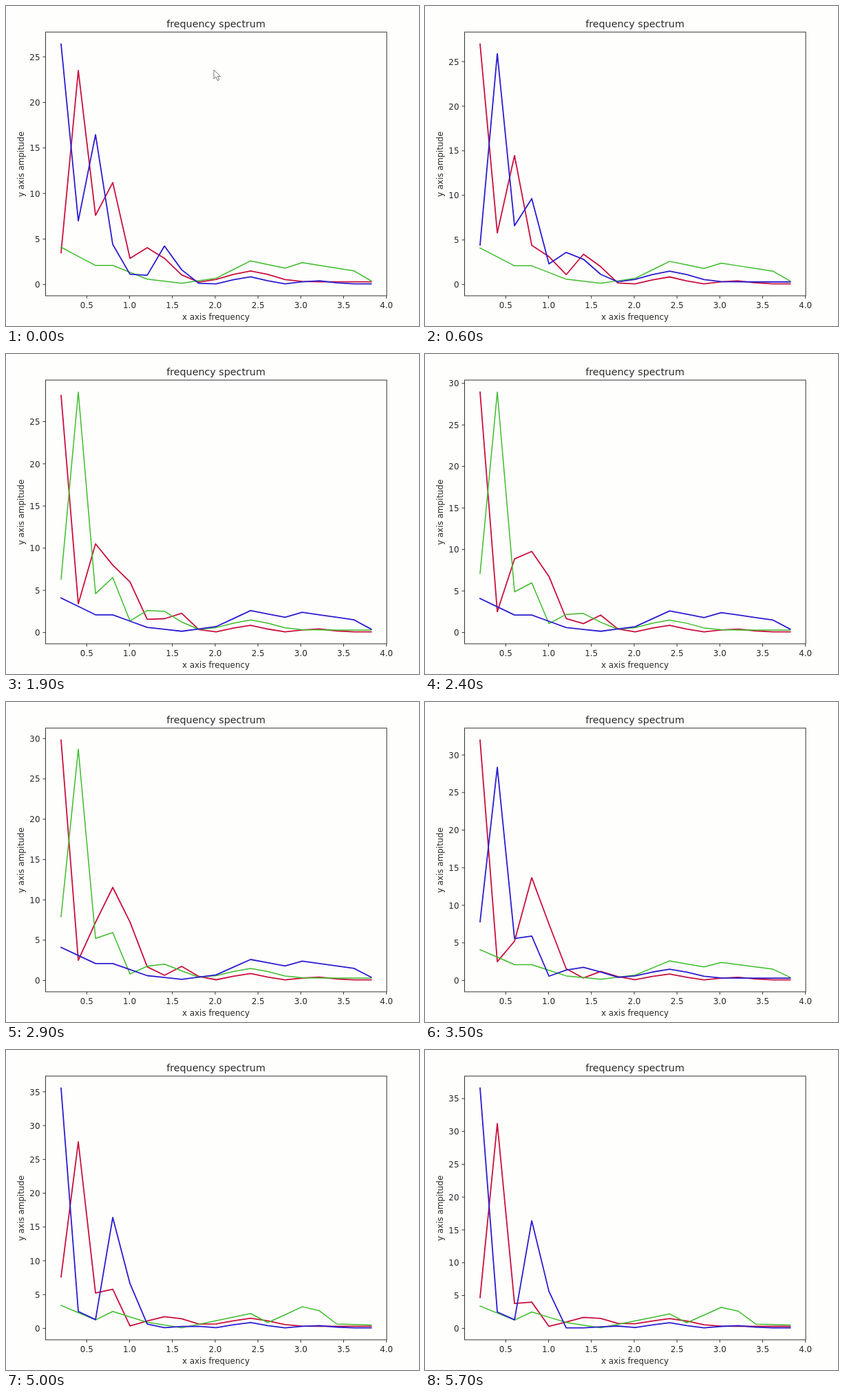
Recreate the animation shown at these times as an HTML page. Size 600 by 466 pixels, loop 5.8 s.

```html
<!DOCTYPE html>
<html lang="en">
<head>
<meta charset="utf-8">
<title>frequency spectrum</title>
<style>
  html, body { margin: 0; width: 100%; height: 100%; overflow: hidden; background: #fefefd; }
  svg { display: block; width: 600px; height: 466px; }
  text { font-family: "DejaVu Sans", Verdana, sans-serif; font-size: 11.9px; fill: #292929; }
  .title { font-size: 14.28px; }
  .axis { fill: none; stroke: #333; stroke-width: 1; }
  .curve { fill: none; stroke-linejoin: round; stroke-linecap: square; }
  .red { stroke: #c90f3c; stroke-width: 1.8; }
  .green { stroke: #3cbc2a; stroke-width: 1.5; }
  .blue { stroke: #2b1cd0; stroke-width: 1.8; }
</style>
</head>
<body>
<svg viewBox="0 0 600 466">
  <g id="curves"></g>
  <rect class="axis" x="57.5" y="38" width="495.6" height="384"/>
  <g id="xTicks"></g>
  <g id="yTicks"></g>
  <text class="title" x="305" y="31" text-anchor="middle">frequency spectrum</text>
  <text x="305" y="456.8" text-anchor="middle">x axis frequency</text>
  <text transform="translate(25.5 230.4) rotate(-90)" text-anchor="middle">y axis ampitude</text>
  <path id="cursor" d="M302 93v13l3-2.8 2.4 5.4 2.3-1-2.3-5.1h4z" fill="#fff" stroke="#777" stroke-width="1"/>
</svg>
<script>
const LOOP = 5800, STEP = 100, BINS = 19;
const BOTTOM = 404.6, SPAN = 349.1, FIRST_X = 80, GAP = 25.03;

const clamp = (v, low, high) => Math.min(high, Math.max(low, v));
const bump = (x, center, width) => Math.exp(-(((x - center) / width) ** 2));
const mix = (a, b, u) => a + (b - a) * u;

// Straight lines through [position, value] points, flat beyond both ends.
function track(at, ...points) {
  const next = points.findIndex(p => p[0] >= at);
  if (next <= 0) return points.at(next)[1];
  const [a, b] = [points[next - 1], points[next]];
  return mix(a[1], b[1], (at - a[0]) / (b[0] - a[0]));
}

// Strongest in the first bin; its second peak wanders from bin 2 to bin 3.
function lowSpectrum(i, s) {
  const swell = i === 5 ? 1.6 * Math.sin(Math.PI * s / 54) : 0;
  const lobe = Math.max(0.3, 4.2 - 0.09 * s) * bump(i, 6.1 + 0.03 * s, 0.9);
  const ripple = Math.cos(Math.PI * (i - 11) / 4) ** 2 * Math.max(0, 18 - i) / 9;
  switch (i) {
    case 0: return track(s, [0, 26.4], [18, 28.1], [28, 29.8], [40, 34.15], [54, 36.6]);
    case 1: return Math.max(2.5, 7 - 0.2 * s);
    case 2: return Math.max(1.3, 16.45 - 0.33 * s);
    case 3: return clamp(1.6 + 0.355 * s, 4.4, 16.4);
    case 4: return 7.5 - 0.0052 * (s - 35) ** 2;
    default: return 0.08 + swell + lobe + (i > 8 ? ripple : 0);
  }
}

// Strongest in the second bin, with a slowly fading lobe and a faint hump.
function midSpectrum(i, s) {
  switch (i) {
    case 0: return track(s, [0, 3.5], [28, 7.9], [48, 7.6], [54, 4.7]);
    case 1: return track(s, [0, 23.5], [10, 27.5], [22, 29], [48, 27.6], [54, 31.2]);
    case 2: return track(s, [0, 7.6], [18, 4.6], [44, 6.2], [54, 3.8]);
    case 3: return track(s, [0, 11.2], [20, 6], [48, 5.8], [54, 4]);
    default: return 0.05 + Math.max(1.7, 4 - 0.07 * s) * bump(i, 5 + 0.025 * s, 1.7)
      + (i > 8 ? 0.25 : 0) + 1.2 * bump(i, 11, 1.6);
  }
}

// Low and broad; the right-hand hump sharpens late in the loop.
function broadSpectrum(i, s) {
  const early = track(i, [0, 4.1], [2, 2.1], [3, 2.1], [5, 0.6], [7, 0.15],
    [9, 0.7], [11, 2.6], [13, 1.8], [14, 2.4], [17, 1.5], [18, 0.4]);
  const late = track(i, [0, 3.4], [2, 1.25], [3, 2.5], [5, 0.9], [7, 0.08],
    [11, 2.2], [12, 0.85], [14, 3.2], [15, 2.6], [16, 0.65], [18, 0.5]);
  return mix(early, late, clamp((s - 40) / 8, 0, 1));
}

// Colours of the low, mid and broad spectrum from a given step on.
const colorChanges = [
  [0, "blue red green"], [5, "red blue green"], [14, "red green blue"],
  [34, "red blue green"], [44, "blue red green"],
];

const $ = id => document.getElementById(id);
function add(parent, tag, attrs, text = "") {
  const el = document.createElementNS("http://www.w3.org/2000/svg", tag);
  for (const name in attrs) el.setAttribute(name, attrs[name]);
  el.textContent = text;
  return parent.appendChild(el);
}

for (let i = 0; i < 8; i++) {
  const x = 117.3 + 62.2 * i;
  add($("xTicks"), "path", { class: "axis", d: `M${x} 422v4` });
  add($("xTicks"), "text", { x, y: 440, "text-anchor": "middle" }, (0.5 + i / 2).toFixed(1));
}
const yTicks = Array.from({ length: 8 }, (_, i) => {
  const group = add($("yTicks"), "g", {});
  add(group, "path", { class: "axis", d: "M53.5 0h4" });
  add(group, "text", { x: 49.5, y: 4.6, "text-anchor": "end" }, String(i * 5));
  return group;
});
const lines = {};
for (const color of ["red", "green", "blue"])
  lines[color] = add($("curves"), "polyline", { class: "curve " + color });

function draw(tick) {
  // The picture rests for a moment at 600 ms and around 5000 ms.
  const step = tick - (tick > 6) - (tick > 49) - (tick > 50);
  const spectra = [lowSpectrum, midSpectrum, broadSpectrum].map(spectrum =>
    Array.from({ length: BINS }, (_, i) => spectrum(i, step)));
  const colors = colorChanges.findLast(c => c[0] <= step)[1].split(" ");

  const all = spectra.flat(), low = Math.min(...all), high = Math.max(...all);
  const toY = v => BOTTOM - (v - low) * SPAN / (high - low);
  spectra.forEach((values, k) => lines[colors[k]].setAttribute("points",
    values.map((v, i) => `${(FIRST_X + GAP * i).toFixed(2)},${toY(v).toFixed(2)}`).join(" ")));
  yTicks.forEach((group, i) => {
    const y = toY(i * 5);
    group.setAttribute("transform", `translate(0 ${y.toFixed(2)})`);
    group.style.display = y < 38 ? "none" : "";
  });
  $("cursor").setAttribute("transform", `translate(0 ${-115 * Math.min(1, tick / 4)})`);
}

let start, shown = -1;
function frame(now) {
  start ??= now;
  const tick = Math.floor((now - start) % LOOP / STEP);
  if (tick !== shown) draw(shown = tick);
  requestAnimationFrame(frame);
}
draw(0);
requestAnimationFrame(frame);
</script>
</body>
</html>
```
